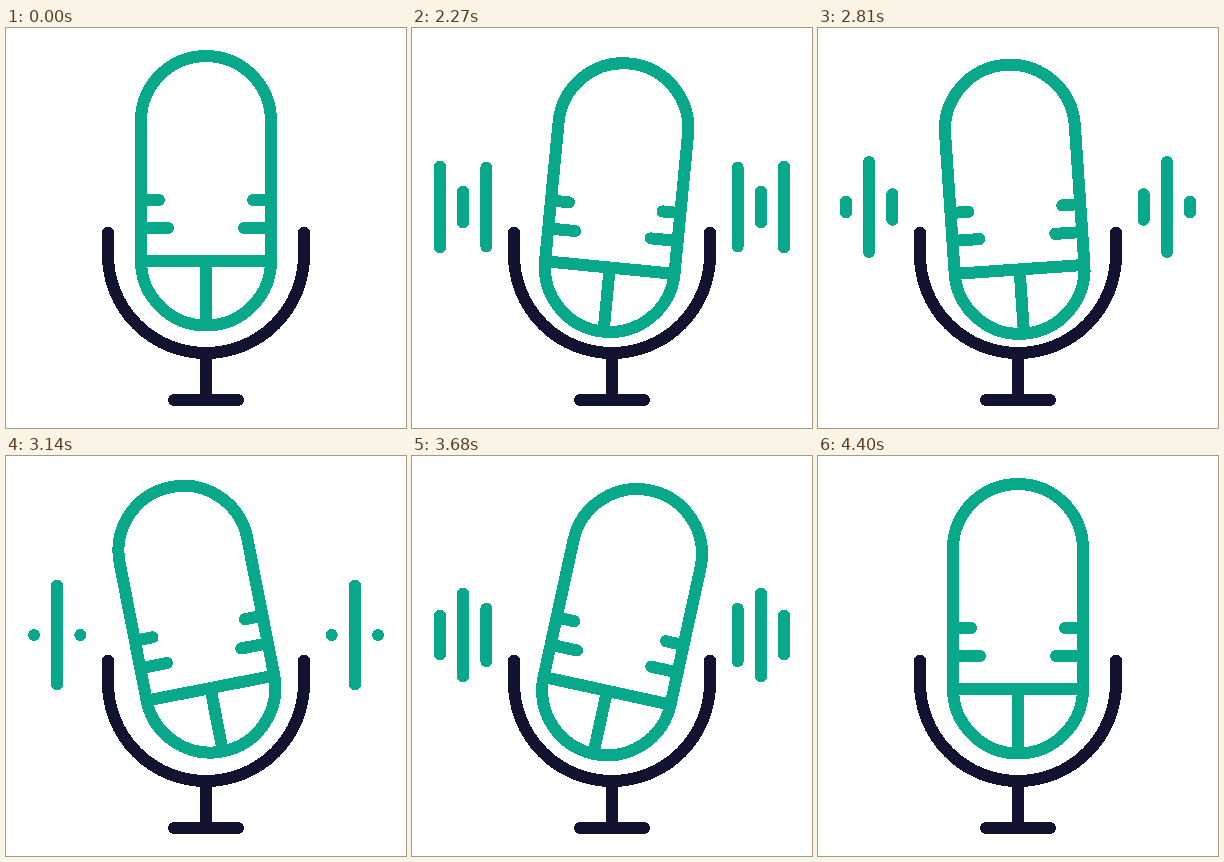
Write an HTML page that moves like this. It is 400 by 400 pixels and loops after 4430 ms.

```html
<!DOCTYPE html>
<html lang="en">
<head>
<meta charset="utf-8">
<title>Microphone</title>
<style>
  html, body { margin: 0; width: 100%; height: 100%; overflow: hidden; background: #fff; }
  svg { display: block; width: 100vw; height: 100vh; shape-rendering: crispEdges; }
  path { fill: none; stroke: #08a88a; stroke-width: 12; stroke-linecap: round; stroke-linejoin: round; }
  .stand { stroke: #121331; }
</style>
</head>
<body>
<svg viewBox="0 0 400 400">
  <path class="stand" d="M102 204.5V227a98 98 0 0 0 196 0V204.5M200 325V372M168 372H232"/>
  <path id="mic" d="M135 93a65 65 0 0 1 130 0V232.5a65 65 0 0 1-130 0ZM135 172H153M135 200H162M265 172H247M265 200H238M135 233H265M200 233V297"/>
  <path id="bars"/>
</svg>
<script>
const LOOP = 4430, REST = 2000, STEP = 30, MOVE = 2400;
const mic = document.getElementById('mic');
const bars = document.getElementById('bars');

// Sum of standing waves, zero at both ends of the movement (p = 0 and p = 1).
const waves = (p, ...amps) =>
  amps.reduce((sum, amp, i) => sum + amp * Math.sin((i + 1) * Math.PI * p), 0);

// Two full swings, faded in and out.
function tilt(p) {
  const fade = Math.min(1, p / 0.15, (1 - p) / 0.15);
  return 12.5 * fade * Math.sin(4 * Math.PI * (p - 0.062));
}

const drop = p => waves(p, 5, 2.4, 6.8, -2.6);

// A mirrored pair of sound bars.
function barPair(x, length) {
  const size = Math.max(0, length);
  const line = `${179 - size / 2}v${size}`;
  return `M${x} ${line}M${400 - x} ${line}`;
}

function draw(now) {
  const elapsed = Math.max(0, now % LOOP - REST);
  const p = Math.min(1, Math.floor(elapsed / STEP) * STEP / MOVE);
  mic.setAttribute('transform', `translate(0 ${drop(p)}) rotate(${tilt(p)} 200 210)`);
  bars.setAttribute('d', p > 0 && p < 1
    ? barPair(28, waves(p, 31, 16, 32, 32))
      + barPair(51, waves(p, 101, -3, 3, -5))
      + barPair(74.3, waves(p, 42, 7, 49, 17))
    : '');
}

function frame() {
  draw(performance.now());
  requestAnimationFrame(frame);
}
frame();
</script>
</body>
</html>
```
